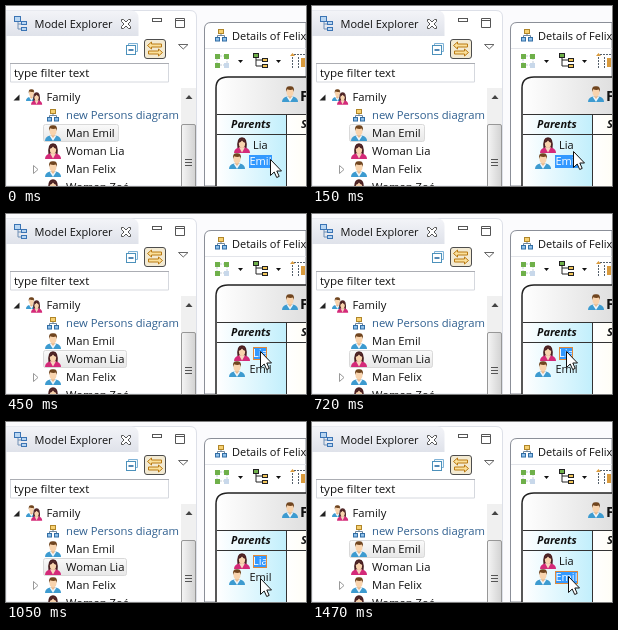
These frames come from a looping animation (300 px wide and 180 px high, 1650 ms). An HTML page:

```html
<!DOCTYPE html>
<html lang="en">
<head>
<meta charset="utf-8">
<title>Selection follows the tree</title>
<style>
html, body { margin: 0; width: 100%; height: 100%; overflow: hidden; background: #fff; }
svg { display: block; width: 100vw; height: 100vh; }
text { font: 11.25px "Open Sans", "Noto Sans", sans-serif; fill: #111; }
.small { font-size: 11px; }
.head { font-size: 11px; font-weight: 700; font-style: italic; }
.link { fill: #2f5f8f; }
.pick text { fill: #fff; }
.pick rect { fill: #3399ff; }
.pick .ring { fill: none; stroke: #e0893a; }

#cursor, .first, .second, .focus { animation: 1650ms step-end infinite; }
#cursor { animation-name: move; }
.first { animation-name: first; }
.second { animation-name: second; }
.focus { animation-name: focus; }

@keyframes move {
  0% { transform: translate(264px, 153px); }
  9.0909% { transform: translate(261px, 145px); }
  18.1818% { transform: translate(256px, 137px); }
  27.2727% { transform: translate(254px, 137px); }
  54.5454% { transform: translate(255px, 149px); }
  63.6363% { transform: translate(254px, 156px); }
  72.7272%, 100% { transform: translate(256px, 154px); }
}
@keyframes first {
  0% { visibility: visible; }
  27.2727% { visibility: hidden; }
  72.7272%, 100% { visibility: visible; }
}
@keyframes second {
  0% { visibility: hidden; }
  27.2727% { visibility: visible; }
  72.7272%, 100% { visibility: hidden; }
}
@keyframes focus {
  0% { visibility: hidden; }
  72.7272%, 100% { visibility: visible; }
}
</style>
</head>
<body>
<svg viewBox="0 0 300 180" preserveAspectRatio="none">
  <defs>
    <linearGradient id="tab" x2="0" y2="1">
      <stop stop-color="#f3f4f8"/><stop offset="1" stop-color="#dfe2ea"/>
    </linearGradient>
    <linearGradient id="title">
      <stop stop-color="#fff"/><stop offset="1" stop-color="#dcdcdc"/>
    </linearGradient>
    <linearGradient id="blue">
      <stop stop-color="#fff"/><stop offset="1" stop-color="#c2effc"/>
    </linearGradient>
    <linearGradient id="cream">
      <stop stop-color="#fff"/><stop offset="1" stop-color="#fffae0"/>
    </linearGradient>
    <linearGradient id="row" x2="0" y2="1">
      <stop stop-color="#fafafa"/><stop offset="1" stop-color="#e7e7e7"/>
    </linearGradient>
    <linearGradient id="thumb">
      <stop stop-color="#f5f5f5"/><stop offset="1" stop-color="#d2d2d2"/>
    </linearGradient>

    <g id="man">
      <path d="M0 16Q0 11.5 5 10.5H11Q16 11.5 16 16Z" fill="#3d9bd0"/>
      <path d="M4.5 10.5L8 16L11.5 10.5Z" fill="#eef6fb"/>
      <path d="M6.3 8h3.4v3L8 13L6.3 11Z" fill="#eab98d"/>
      <ellipse cx="8" cy="5.8" rx="3.5" ry="4.6" fill="#f8d3ad"/>
      <path d="M4.2 6Q3 0 8 .3Q13 0 11.8 6L11 3.6Q8 4.4 5 3.3Z" fill="#70451f"/>
    </g>
    <g id="woman">
      <path d="M3.5 12Q2 .2 8 .2Q14 .2 12.5 12Z" fill="#4a2022"/>
      <path d="M0 16Q0 11.5 5 10.5H11Q16 11.5 16 16Z" fill="#d42a79"/>
      <path d="M5 10.3L8 15.5L11 10.3Z" fill="#f6d6bd"/>
      <ellipse cx="8" cy="6.6" rx="3.1" ry="4.3" fill="#f8d3ad"/>
      <path d="M4.5 6Q5 1.5 8 2Q11.5 2 11.5 6Q9 5 8 3.5Q7 5 4.5 6Z" fill="#4a2022"/>
    </g>
    <g id="chart">
      <path d="M6 4v3M2.5 9V6.5h7V9" fill="none" stroke="#71879c"/>
      <rect x="3.5" y=".5" width="5" height="4" fill="#f7d070" stroke="#b0862a"/>
      <rect x=".5" y="8.5" width="4" height="3.5" fill="#8fc0ea" stroke="#316da4"/>
      <rect x="7.5" y="8.5" width="4" height="3.5" fill="#8fc0ea" stroke="#316da4"/>
    </g>
    <path id="drop" d="M0 0h5L2.5 3Z" fill="#111"/>
  </defs>

  <rect width="300" height="180" fill="#fbfbfd"/>

  <!-- explorer -->
  <path d="M0 4.5H184Q190.5 4.5 190.5 11V180H0Z" fill="#fff" stroke="#dde0e8"/>
  <path d="M0 4.5H125Q132.5 4.5 132.5 12V30H0Z" fill="url(#tab)"/>
  <path d="M12 14v9h4M12 18h4" fill="none" stroke="#6f8fb5"/>
  <g fill="#b9d6f2" stroke="#3b74b4">
    <rect x="8.5" y="10.5" width="6" height="5"/>
    <rect x="15.5" y="15.5" width="5" height="3"/>
    <rect x="15.5" y="21.5" width="5" height="3"/>
  </g>
  <text class="small" x="28.5" y="22">Model Explorer</text>
  <path d="M115.5 13.5h2l2.5 2.5 2.5-2.5h2v2L122 18l2.5 2.5v2h-2L120 20l-2.5 2.5h-2v-2L118 18l-2.5-2.5Z" fill="#fff" stroke="#555"/>
  <rect x="146.5" y="12.5" width="9" height="3" fill="#fff" stroke="#555"/>
  <path d="M169.5 12.5h9v9h-9ZM169.5 14.5h9" fill="#fff" stroke="#555"/>

  <path d="M122.5 39V37.5h9v8H130" fill="#f2f8fc" stroke="#7fb2d6"/>
  <rect x="120.5" y="39.5" width="9" height="9" fill="#fff" stroke="#4c91bb"/>
  <path d="M122.5 44h5" stroke="#17609c" stroke-width="1.5"/>
  <rect x="138.5" y="33.5" width="21" height="19" rx="2.5" fill="#f3ead2" stroke="#4d4d4d"/>
  <path d="M141.5 39.5l4-3.5v2h10v3h-10v2Z" fill="#fbe09a" stroke="#b97a14"/>
  <path d="M156.5 46.5l-4-3.5v2h-10v3h10v2Z" fill="#fbe09a" stroke="#b97a14"/>
  <path d="M172.5 38.5h9.5l-4.75 4.5Z" fill="#fff" stroke="#666"/>

  <path d="M4.5 76V57.5H162.5V76Z" fill="#fff" stroke="#d5d8de"/>
  <path d="M4 57.5H163" stroke="#abadb3"/>
  <text x="8" y="71" style="font-size:11.6px">type filter text</text>

  <path d="M7.5 94.5h6v-6Z" fill="#222"/>
  <use href="#man" transform="translate(20 83) scale(.68 .75)"/>
  <use href="#woman" transform="translate(25 86) scale(.7 .8)"/>
  <text x="40.5" y="95">Family</text>
  <use href="#chart" x="41" y="103"/>
  <text class="link" x="60" y="113">new Persons diagram</text>

  <g fill="url(#row)" stroke="#d9d9d9">
    <rect class="first" x="37.5" y="118.5" width="75" height="17" rx="2"/>
    <rect class="second" x="37.5" y="136.5" width="83" height="17" rx="2"/>
  </g>
  <use href="#man" x="39" y="119"/>
  <text x="60" y="131">Man Emil</text>
  <use href="#woman" x="39" y="137"/>
  <text x="60" y="149">Woman Lia</text>
  <path d="M27.5 159.5v8l4.5-4Z" fill="#fff" stroke="#999"/>
  <use href="#man" x="39" y="155"/>
  <text x="60" y="167">Man Felix</text>
  <use href="#woman" x="39" y="173"/>
  <text x="60" y="185">Woman Zoé</text>

  <rect x="175" y="82" width="15" height="98" fill="#f0f0f0"/>
  <path d="M179.5 93h7L183 89Z" fill="#444"/>
  <rect x="175.5" y="118.5" width="14" height="70" rx="1.5" fill="url(#thumb)" stroke="#979797"/>
  <path d="M179 153.5h7M179 156.5h7M179 159.5h7" stroke="#555"/>

  <!-- details -->
  <path d="M198.5 180V23Q198.5 16.5 205 16.5H300V180Z" fill="#fff" stroke="#8b8f98"/>
  <use href="#chart" x="209" y="23"/>
  <text class="small" x="226" y="34">Details of Felix</text>
  <path d="M199 42.5H300" stroke="#e3e5ea"/>

  <path d="M211 50h10v9h-10Z" fill="none" stroke="#c3ccd5" stroke-dasharray="2 1"/>
  <g fill="#6fb04a">
    <rect x="209" y="48" width="5" height="5"/>
    <rect x="218" y="48" width="5" height="5"/>
    <rect x="209" y="57" width="5" height="5"/>
  </g>
  <rect x="218" y="57" width="5" height="5" fill="#c8d8ea"/>
  <use href="#drop" x="232" y="54"/>
  <path d="M250 49v11h8M250 54h8" fill="none" stroke="#222"/>
  <rect x="247.5" y="47.5" width="5" height="4" fill="#6fb04a" stroke="#222"/>
  <rect x="256.5" y="52.5" width="5" height="3" fill="#f3c65a" stroke="#222"/>
  <rect x="256.5" y="58.5" width="5" height="3" fill="#f3c65a" stroke="#222"/>
  <use href="#drop" x="270" y="54"/>
  <path d="M286.5 62V48.5H300M292.5 62V50" fill="none" stroke="#55606b" stroke-dasharray="2 1"/>
  <path d="M284 50l2.5-3 2.5 3ZM295 52h4v9h-4Z" fill="#d99a3c"/>

  <path d="M210 180V82Q210 71 222 71H310V190H210Z" fill="url(#title)" stroke="#222" stroke-width="1.5"/>
  <use href="#man" x="276" y="80"/>
  <text x="294" y="95" style="font-size:15px;font-weight:700">Felix</text>
  <rect x="211" y="108" width="69" height="72" fill="url(#blue)"/>
  <rect x="280" y="108" width="70" height="72" fill="url(#cream)"/>
  <path d="M211 108.5H300M211 128.5H300M280.5 108V180" stroke="#333"/>
  <text class="head" x="225" y="122">Parents</text>
  <text class="head" x="295" y="122">Siblings</text>

  <use href="#woman" x="228" y="131"/>
  <use href="#man" x="223" y="147"/>
  <text class="small" x="247" y="143">Lia</text>
  <text class="small" x="243.5" y="159">Emil</text>
  <g class="pick">
    <g class="second">
      <rect x="247" y="133" width="14" height="13"/>
      <text class="small" x="247" y="143">Lia</text>
      <rect class="ring" x="247.5" y="133.5" width="13" height="12"/>
    </g>
    <g class="first">
      <rect x="243" y="149" width="23" height="13"/>
      <text class="small" x="243.5" y="159">Emil</text>
    </g>
    <rect class="ring focus" x="243.5" y="149.5" width="22" height="12"/>
  </g>

  <path id="cursor" d="M.5 .5V16.5L4.2 13L6.7 18.5L9.2 17.4L6.8 12H11.5Z" fill="#fff" stroke="#111"/>
</svg>
</body>
</html>
```
